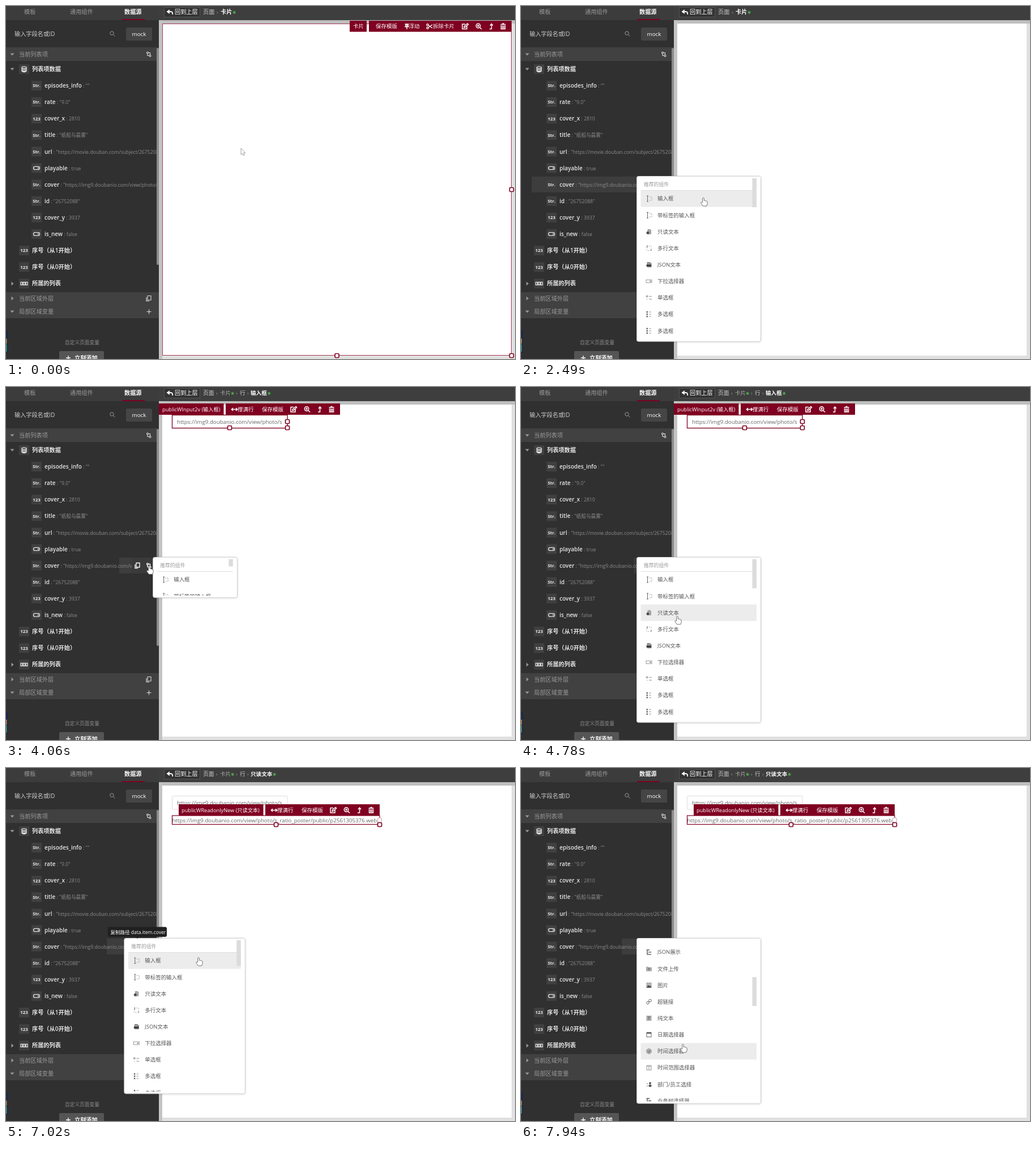
Write an HTML page that moves like this. It is 899 px wide and 623 px high and loops after 8000 ms.

```html
<!DOCTYPE html>
<html lang="zh">
<head>
<meta charset="utf-8">
<title>组件编辑器</title>
<style>
html, body { margin: 0; width: 100%; height: 100%; overflow: hidden; background: #303030; }
svg { display: block; width: 899px; height: 623px; font-family: 'Open Sans', 'Noto Sans', 'Noto Sans CJK SC', 'Noto Sans CJK', sans-serif; }
text { white-space: pre; }
</style>
</head>
<body>
<svg id="stage" viewBox="0 0 899 623" xmlns="http://www.w3.org/2000/svg"></svg>
<script>
const LOOP = 8000, RED = '#7f0021', ROW = 29.15;
const FIRST_Y = 340;

// Markup helpers; text is placed by its vertical centre.
const rect = (x, y, w, h, fill, extra = '') =>
  `<rect x="${x}" y="${y}" width="${w}" height="${h}" fill="${fill}" ${extra}/>`;
const text = (x, y, s, size = 10.2, fill = '#ddd', extra = '') =>
  `<text x="${x}" y="${y + size * 0.36}" font-size="${size}" fill="${fill}" ${extra}>${s}</text>`;
const group = (id, body, extra = '') => `<g id="${id}" ${extra}>${body}</g>`;

const shapes = {
  edit: '<path d="M3-.5V4.5H-5V-4H0M-2 2L-1.5-.5 4-5 5.5-3.5 0 1.5Z"/>',
  zoom: '<circle cx="-1" cy="-1" r="3.7"/><path d="M2 2L5 5M-3-1H1M-1-3V1"/>',
  up: '<path d="M-3 4.5H.5V-3M-2-1.5L.5-4.5 3-1.5"/>',
  trash: '<path d="M-4.5-3.5H4.5M-1.5-5H1.5M-3.5-2V4.5H3.5V-2M-1.2-1.5V3.5M1.2-1.5V3.5"/>',
  pin: '<path d="M-3.5-4H3.5M-2-4V0M2-4V0M-4 .5H4M0 1V5M0-4V0"/>',
  cut: '<circle cx="-3.5" cy="-2.8" r="1.6"/><circle cx="-3.5" cy="2.8" r="1.6"/><path d="M-2-2L5 3M-2 2L5-3"/>',
  wide: '<path d="M-5 0H5M-2.5-2.5L-5 0-2.5 2.5M2.5-2.5L5 0 2.5 2.5"/>',
  back: '<path d="M-1-4L-5-1-1 2M-4.5-1H1Q5-1 4 4"/>',
  link: '<circle cx="-2" cy="-2.5" r="1.5"/><circle cx="2.5" cy="3" r="1.5"/><path d="M-2-1V2.5H1M0-2.5H2.5V1.500"/>',
  copy: '<path d="M-2-4.5H4V3H-2ZM-4-2V4.8H1"/>',
  plus: '<path d="M-4 0H4M0-4V4"/>',
  search: '<circle cx="-1" cy="-1" r="3.2"/><path d="M1.5 1.5L4.5 4.5"/>',
  data: '<ellipse cy="-3" rx="4" ry="1.7"/><path d="M-4-.5Q0 2.500 4-.5M-4 2Q0 5 4 2M-4-3V3.500Q0 6.500 4 3.500V-3"/>',
  toggle: '<rect x="-5.5" y="-2.7" width="11" height="5.4" rx="2.7"/><path d="M2 0H3.5" stroke-width="2.4"/>',
  list: '<path d="M-6-2.5H-3V2.5H-6ZM-1.5-2.5H1.5V2.5H-1.5ZM3-2.5H6V2.5H3Z"/>',
  input: '<path d="M-4-5H-1M-2.5-5V5M-4 5H-1"/><path d="M0-3H5V3H0" stroke="#aaa" stroke-dasharray="2 1"/>',
  file: '<path d="M-2-4H2L3.5-2.5V4H-2Z" fill="#aaa" stroke="#999"/><circle cx="-2" cy="2" r="2.2" fill="#444"/>',
  area: '<path d="M-4-4H4V4H-4Z" stroke="#aaa" stroke-dasharray="2 2"/><path d="M-3-5V-1M3 3H5"/>',
  json: '<path d="M-3-4H2L4-2V4H-3Z" fill="#999" stroke="#777"/><path d="M-4.5 1.5H4" stroke="#333" stroke-width="3"/>',
  select: '<rect x="-5" y="-2.5" width="10" height="5" stroke="#999"/><path d="M1.5 0H3.5" stroke-width="2"/>',
  radio: '<circle cx="-3.5" cy="-2.5" r="1.3"/><path d="M0-2.5H5M-4 2.5H-2.5M0 2.5H5" stroke="#999"/>',
  checks: '<path d="M-4.5-4H-2M-4.5 0H-2M-4.5 4H-2" stroke-width="2.6"/><path d="M0-4H4M0 0H4M0 4H4" stroke="#999"/>',
  tree: '<path d="M-4.5-4H1M-1 0H4M-1 4H4M-3-3V4H-1" stroke-width="1.6"/>',
  upload: '<path d="M-4.5-3H-1L0-2H4.5V4H-4.5Z" fill="#aaa" stroke="#aaa"/><path d="M0 3V-1M-1.5 .5L0-1 1.5 .5"/>',
  image: '<rect x="-4" y="-4" width="8" height="8" fill="#bbb" stroke="#999"/><path d="M-4 4L-1 0 1 2 2.5 1 4 4Z" fill="#444"/>',
  chain: '<circle cx="-2" cy="2" r="2.3"/><circle cx="2" cy="-2" r="2.3"/><path d="M-1 1L1-1"/>',
  letter: '<rect x="-4" y="-4" width="8" height="8" fill="#aaa" stroke="#aaa"/><path d="M-2-2H2M0-2V3"/>',
  date: '<rect x="-4" y="-4" width="8" height="8"/><path d="M-4-3H4" stroke-width="2.5"/>',
  clock: '<circle r="4.6" fill="#aaa" stroke="#aaa"/><path d="M-2 0L0 2 2-2"/>',
  range: '<rect x="-4" y="-4" width="8" height="8" stroke="#999"/><path d="M-2-1H2M-2 2H2M-4-3H4" stroke="#999"/>',
  staff: '<circle cx="2" cy="-2" r="1.5" fill="#444"/><path d="M0 4V1H4V4ZM-4-1H-2M-4 3H-2" fill="#444"/>'
};
const icon = (name, x, y, color = '#fff', width = 1.3) =>
  `<g transform="translate(${x} ${y})" fill="none" stroke="${color}" stroke-width="${width}">${shapes[name]}</g>`;
const sideIcon = (name, x, y) => icon(name, x, y, '#ddd', 1.1);

const caret = (y, open) =>
  `<path transform="translate(11 ${y})" fill="#999" d="${open ? 'M-3.5-1.5H3.5L0 2.5Z' : 'M-1.5-3.5L2.5 0-1.5 3.5Z'}"/>`;
const badge = (x, y, kind) => rect(x, y - 8.5, 18, 17, '#404040') +
  (shapes[kind] ? icon(kind, x + 9, y, '#e4e4e4')
    : text(x + 9, y, kind, 7.8, '#eee', 'text-anchor="middle" font-weight="700"'));
const handle = (x, y) => rect(x - 3.5, y - 3.5, 7, 7, '#fff', `rx="1.5" stroke="${RED}" stroke-width="1.7"`);

// Sidebar
const fields = [
  ['Str.', 'episodes_info', '""'], ['Str.', 'rate', '"9.0"'], ['123', 'cover_x', '2810'],
  ['Str.', 'title', '"纸船与晨雾"'], ['Str.', 'url', '"https://movie.douban.com/subject/26752088/"'],
  ['toggle', 'playable', 'true'], ['Str.', 'cover', '"https://img9.doubanio.com/view/photo/s_ratio_poster"'],
  ['Str.', 'id', '"26752088"'], ['123', 'cover_y', '3937'], ['toggle', 'is_new', 'false']
];
const medium = 'font-weight="500"', strong = 'font-weight="600"';
const fieldRow = ([kind, name, value], i) => {
  const y = 140.5 + 29.1 * i;
  return badge(45, y, kind) + text(68, y,
    `<tspan ${strong}>${name}</tspan><tspan font-size="8.7" fill="#8b8b8b"> : ${value}</tspan>`, 10, '#e6e6e6');
};
function sidebar() {
  return rect(0, 0, 270, 623, '#303030') + rect(0, 0, 270, 25, '#3c3c3c') +
    text(32, 10, '模板', 10.2, '#999') + text(113, 10, '通用组件', 10.2, '#999') +
    text(209, 10, '数据源', 10.2, '#fff', strong) + rect(205, 23, 40, 2, RED) +
    text(15, 49.5, '输入字段名或ID', 10.2, '#ccc') + icon('search', 188, 49, '#999', 1) +
    rect(212, 38, 46, 23, '#454545', 'rx="2"') + text(235, 49.5, 'mock', 9.8, '#fff', `text-anchor="middle" ${medium}`) +
    rect(0, 73, 270, 24, '#414141') + caret(85, true) + text(23, 85, '当前列表项', 10.2, '#999') + sideIcon('link', 252, 85) +
    caret(111, true) + badge(23, 111.5, 'data') + text(46, 111.5, '列表项数据', 10.2, '#e6e6e6', strong) +
    group('hover', '<rect id="hoverBox" y="301" height="28" fill="#3d3d3d"/>') +
    `<g clip-path="url(#sideClip)">${fields.map(fieldRow).join('')}</g>` +
    group('rowTools', rect(222, 301, 44, 28, '#3a3a3a') + icon('copy', 232, 315) + icon('link', 252, 315)) +
    [['123', '序号（从1开始）'], ['123', '序号（从0开始）'], ['list', '所属的列表']].map(([kind, name], i) =>
      badge(23, 431.6 + 29.1 * i, kind) + text(46, 431.6 + 29.1 * i, name, 10.2, '#e6e6e6', strong)).join('') +
    caret(490, false) + rect(0, 505, 270, 46, '#414141') + caret(516, false) + caret(539, true) +
    text(23, 516, '当前区域外层', 10.2, '#999') + text(23, 539, '局部区域变量', 10.2, '#999') +
    sideIcon('copy', 252, 516) + sideIcon('plus', 252.5, 539.5) +
    text(104, 593.5, '自定义页面变量', 8.7, '#8b8b8b') +
    rect(94, 609, 79, 20, '#555', 'rx="2"') + icon('plus', 110, 621) + text(121, 621, '立刻添加', 10.2, '#fff', strong) +
    rect(0, 573, 3.5, 39, '#1d2948') + rect(0, 587, 1.5, 9, '#c58a3a') + rect(0, 597, 1.5, 13, '#3e9a76') +
    rect(266, 74, 4, 383, '#8a8a8a', 'rx="2"');
}

// Breadcrumb
const arrow = x => text(x, 10.5, '›', 9, '#999');
const star = x => text(x, 11, '✱', 7.5, '#4caf50');
const deepCrumb = (id, last, starX) => group(id,
  text(348, 10.5, '页面', 9.8, '#ccc') + arrow(371) + text(378, 10.5, '卡片', 9.6, '#aaa') + star(397) +
  arrow(406) + text(413, 10.5, '行', 9.6, '#ccc') + arrow(426) + text(432, 10.5, last, 9.6, '#fff', strong) + star(starX));

// Canvas
const toolIcons = (x, y) => ['edit', 'zoom', 'up', 'trash'].map((n, i) => icon(n, x + [0, 24, 46, 67][i], y, '#fff', 1.5)).join('');
const white = (x, y, s, size = 9.5) => text(x, y, s, size, '#fff', medium);
const outline = color => rect(276.5, 31.5, 616, 585, 'none', `stroke="${color}"`);
const partTools = rect(388, 29, 202, 20, RED) + icon('wide', 403.5, 39.5, '#fff', 1.6) +
  white(409, 39.5, '撑满行') + white(452, 39.5, '保存模版') + toolIcons(508, 39.5);
const imageUrl = 'https://img9.doubanio.com/view/photo/s';

function canvas() {
  return rect(270, 0, 629, 25, '#3e3e3e') + rect(270, 25, 629, 598, '#e0e0e0') + rect(270, 25, 629, 6, '#bebebe') +
    rect(270, 25, 6, 598, '#c4c4c4') + rect(276, 31, 617, 586, '#fff') +
    rect(279.5, 2.5, 63, 17, '#333', 'stroke="#555"') + icon('back', 290, 11, '#fff', 1.8) + text(298, 10.5, '回到上层', 10.2, '#fff', medium) +
    group('crumbCard', text(348, 10.5, '页面', 10.2, '#ccc') + arrow(372) + text(379, 10.5, '卡片', 10.2, '#fff', strong) + star(400)) +
    deepCrumb('crumbInput', '输入框', 461.5) + deepCrumb('crumbText', '只读文本', 471) +
    group('cardSelected', outline('#a33b55') +
      rect(607, 26, 30, 19.5, RED) + white(613, 36, '卡片') + rect(641, 26, 252, 19.5, RED) +
      white(653, 36, '保存模版') + icon('pin', 708, 36, '#fff', 1.5) + white(711.5, 36, '浮动') +
      icon('cut', 748, 36) + white(754, 36, '拆除卡片') + toolIcons(811, 36) +
      handle(893, 324) + handle(893, 617) + handle(584.5, 617)) +
    group('cardHover', outline('#cf8ca0') + rect(863, 26, 30, 19.5, '#bd7187') + white(869, 36, '卡片')) +
    group('inputPart', rect(293.5, 49.5, 203.5, 23.5, '#fff', 'stroke="#ddd" rx="1"') + text(302, 61.5, imageUrl, 9.7, '#666')) +
    group('inputSelected', rect(293.5, 49.5, 203.5, 23, 'none', `stroke="${RED}" stroke-width="1.3"`) +
      rect(270, 29, 114.5, 20, RED) + white(276, 39.5, 'publicWInput2v (输入框)', 9.2) + partTools +
      handle(497, 61) + handle(497, 72) + handle(395, 72)) +
    group('textPart', rect(293.5, 84, 366.5, 15.5, '#fff', `stroke="${RED}" stroke-width="1.2"`) +
      `<g clip-path="url(#textClip)">${text(293.5, 92.5, imageUrl + '_ratio_poster/public/p2561305376.webp', 9.7, '#666')}</g>` +
      rect(305, 64, 149.5, 20, RED) + white(310, 74.5, 'publicWReadonlyNew (只读文本)', 9.2) +
      `<g transform="translate(70 35)">${partTools}</g>` +
      rect(656.5, 88, 7, 8, '#fff', 'rx="2" stroke="#c9a0ac"') + handle(660, 100) + handle(477, 100));
}

// Component menu
const menuItems = [
  ['input', '输入框'], ['input', '带标签的输入框'], ['file', '只读文本'], ['area', '多行文本'], ['json', 'JSON文本'],
  ['select', '下拉选择器'], ['radio', '单选框'], ['checks', '多选框'], ['checks', '多选框'], ['select', '开关'],
  ['input', '数字输入框'], ['area', '富文本'], ['tree', 'JSON展示'], ['upload', '文件上传'], ['image', '图片'],
  ['chain', '超链接'], ['letter', '纯文本'], ['date', '日期选择器'], ['clock', '时间选择器'],
  ['range', '时间范围选择器'], ['staff', '部门/员工选择'], ['tree', '业务树选择器'], ['tree', '级联选择器']
];
const menu = () => group('menu',
  '<rect id="menuBox" y="300.5" rx="3" fill="#fff" stroke="#d2d2d2" filter="url(#shadow)"/>' +
  `<g clip-path="url(#menuClip)"><rect id="menuHover" height="29" fill="#ececec"/>` +
  group('menuList', text(13, 314.5, '推荐的组件', 8.8, '#999') + '<rect id="menuLine" x="8" y="325" height="1" fill="#ddd"/>' +
    menuItems.map(([kind, name], i) => icon(kind, 22, FIRST_Y + ROW * i, '#666', 1) +
      text(37, FIRST_Y + ROW * i, name, 9.45, '#555')).join('')) +
  '<rect id="thumb" width="7.5" fill="#dcdcdc"/></g>');

const tooltip = group('tooltip', rect(180, 280.5, 104, 17.5, '#202020', 'rx="3"') +
  '<path d="M229 298H235L232 301Z" fill="#202020"/>' + text(184.5, 289.5, '复制路径 data.item.cover', 8.5, '#fff'));
const pointers =
  group('arrowPointer', '<path d="M0 0V11.5L2.6 9 4.3 13 6.2 12.2 4.5 8.3H8Z" fill="#fff" stroke="#999" stroke-width=".9"/>') +
  group('handPointer', '<path d="M-1.3 9V1.3Q0-.8 1.3 1.3V5.5Q3 4.3 3.6 6 5.2 5.2 5.7 6.8 7.3 6.3 7.2 8.3V11L5.8 15H-.5L-4.2 9.8Q-4.2 7.7-2.5 8.3Z" fill="#fff" stroke="#666" stroke-width=".9"/>');

document.getElementById('stage').innerHTML = `<defs>
  <clipPath id="sideClip">${rect(0, 0, 266, 623, '#000')}</clipPath>
  <clipPath id="textClip">${rect(293, 80, 364, 22, '#000')}</clipPath>
  <clipPath id="menuClip"><rect id="menuMask" y="304"/></clipPath>
  <filter id="shadow"><feDropShadow dx="0" dy="0.5" stdDeviation="1.5" flood-opacity=".22"/></filter>
</defs>` + canvas() + sidebar() + menu() + tooltip + pointers;

const el = {};
document.querySelectorAll('#stage [id]').forEach(n => el[n.id] = n);
const set = (id, attrs) => { for (const k in attrs) el[id].setAttribute(k, attrs[k]); };
const show = (id, on) => { el[id].style.display = on ? '' : 'none'; };

// Keys are [time, ...values].
const pointerKeys = [
  [0, 415, 251], [90, 415, 251], [630, 388, 267], [850, 388, 267], [1180, 335, 412], [1500, 252, 315], [1610, 255, 316],
  [1790, 333, 326], [2150, 322, 338], [2760, 322, 338], [3120, 366, 205], [3500, 366, 205], [3950, 252, 315],
  [4200, 254, 316], [4420, 280, 345], [4780, 276, 404], [5580, 276, 404], [5880, 478, 223], [6500, 486, 219],
  [6740, 232, 314], [6840, 252, 315], [7020, 340, 334], [7400, 330, 340], [7940, 286, 487]
];
const menuKeys = [
  [1580, 0], [1790, 0.66], [1930, 1], [2900, 1], [3120, 0.3], [3230, 0], [4000, 0], [4250, 1],
  [5690, 1], [5880, 0.262], [5960, 0], [6780, 0], [7020, 0.94], [7090, 1]
];
const scrollKeys = [[7440, 0], [7880, 364.8]];

function sample(keys, t) {
  const next = keys.findIndex(k => k[0] > t);
  if (next < 0) return keys[keys.length - 1].slice(1);
  if (next === 0) return keys[0].slice(1);
  const a = keys[next - 1], b = keys[next], u = (t - a[0]) / (b[0] - a[0]);
  return a.slice(1).map((v, i) => v + (b[i + 1] - v) * u);
}
const within = (t, from, to = LOOP) => t >= from && t < to;

function drawMenu(t, x, y) {
  const [open] = sample(menuKeys, t), [scroll] = sample(scrollKeys, t);
  const left = 204 + 73 * (1 - open), right = 424 - 20 * (1 - open), height = 291.5 * open;
  const width = right - left, view = Math.max(0, height - 7);
  const inside = open > 0 && x > left && x < right && y > 301 && y < 301 + height;
  const row = Math.round((y - FIRST_Y - 1 + scroll) / ROW);
  show('menu', open > 0);
  set('menuBox', { x: left + 0.5, width: width - 1, height });
  set('menuMask', { x: left, width, height: view });
  set('menuList', { transform: `translate(${left} ${-scroll})` });
  set('menuLine', { width: width - 16 });
  set('menuHover', { x: left + 7.5, width: width - 15.5, y: FIRST_Y - 14.5 + ROW * row - scroll });
  show('menuHover', inside && row >= 0);
  set('thumb', { x: right - 15.5, y: 304 + scroll * 0.178, height: Math.max(12.5, view * view / 1581) });
  return inside;
}

function render(t) {
  const [x, y] = sample(pointerKeys, t);
  const inMenu = drawMenu(t, x, y);
  const onTools = x > 222 && x < 266 && y > 301 && y < 330;
  const hand = inMenu || onTools;

  show('cardSelected', t < 2400);
  show('cardHover', within(t, 2880, 3620) || within(t, 5720, 6600));
  show('inputPart', t >= 2590);
  show('inputSelected', within(t, 2760, 5400));
  show('textPart', t >= 5400);
  show('crumbCard', t < 2760);
  show('crumbInput', within(t, 2760, 5400));
  show('crumbText', t >= 5400);

  const hovered = within(t, 1450, 3450) || within(t, 3880, 6100) || t >= 6650;
  const hoverX = t < 3450 ? 19 : t < 6100 ? 200 : 178;
  show('hover', hovered);
  show('rowTools', hovered);
  set('hoverBox', { x: hoverX, width: 266 - hoverX });
  show('tooltip', within(t, 6720, 7180));

  show('arrowPointer', !hand);
  show('handPointer', hand);
  set(hand ? 'handPointer' : 'arrowPointer', { transform: `translate(${x} ${y})` });
}

const start = performance.now();
function tick() {
  render((performance.now() - start) % LOOP);
  requestAnimationFrame(tick);
}
tick();
</script>
</body>
</html>
```
